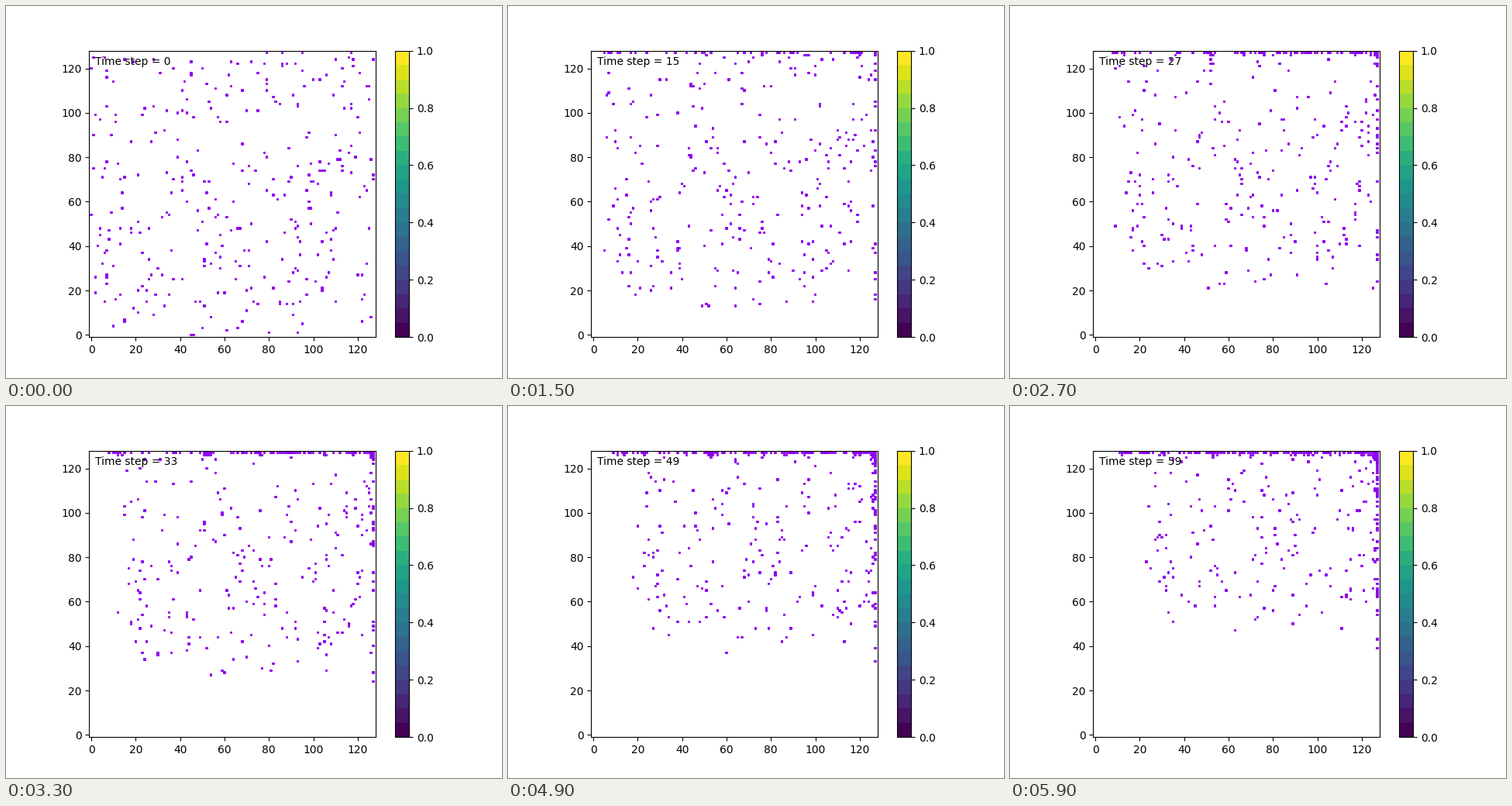
A matplotlib script for the animation above (6000 ms loop, 640x480 px).

```python
import random

import matplotlib.pyplot as plt
from matplotlib.animation import FuncAnimation
from matplotlib.cm import ScalarMappable

SIZE = 128
COUNT = 320
STEPS = 60
COLOR = "#8f00f1"
SLIDE = 0.3  # chance that a blocked diagonal move slips along one axis

rng = random.Random(12)


def pick_move():
    dx = rng.choices((-1, 0, 1), (8, 42, 50))[0]
    dy = rng.choices((-1, 0, 1), (3, 9, 88))[0]
    return dx, dy


def is_free(cell, taken):
    return all(0 <= v < SIZE for v in cell) and cell not in taken


def step(cells):
    """Drift every particle up and right, one particle per cell."""
    cells = list(cells)
    taken = set(cells)
    for i in rng.sample(range(COUNT), COUNT):
        x, y = cells[i]
        dx, dy = pick_move()
        options = [(x + dx, y + dy)]
        if dx and dy and rng.random() < SLIDE:
            options += [(x + dx, y), (x, y + dy)]
        for cell in options:
            if is_free(cell, taken):
                taken.remove(cells[i])
                taken.add(cell)
                cells[i] = cell
                break
    return cells


grid = [(x, y) for x in range(SIZE) for y in range(SIZE)]
history = [rng.sample(grid, COUNT)]
while len(history) < STEPS:
    history.append(step(history[-1]))

fig, ax = plt.subplots(figsize=(6.4, 4.8), dpi=100)
ax.set_aspect("equal")
ax.set_xlim(-1, SIZE)
ax.set_ylim(-1, SIZE)
fig.colorbar(ScalarMappable(cmap=plt.get_cmap("viridis", 20)), ax=ax)

# One colour per point keeps each square snapped to pixels on its own.
dots = ax.scatter(*zip(*history[0]), s=1, marker="s", linewidths=1.5,
                  c=[COLOR] * COUNT)
label = ax.text(0.02, 0.95, "", transform=ax.transAxes)


def draw(n):
    dots.set_offsets(history[n])
    label.set_text(f"Time step = {n}")
    return dots, label


anim = FuncAnimation(fig, draw, frames=STEPS, interval=100, repeat=True)
plt.show()
```
